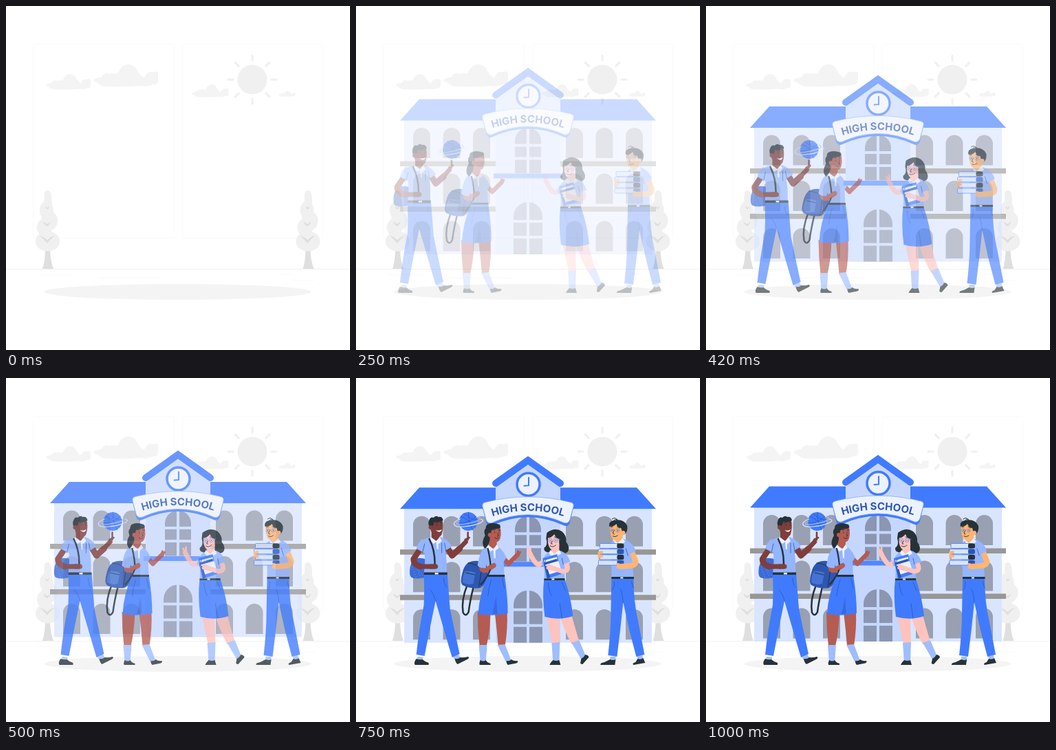
Write an HTML page that moves like this. It is 500 px wide and 500 px high and loops after 1.04 s.

```html
<!DOCTYPE html>
<html lang="en">
<head>
<meta charset="utf-8">
<title>High school</title>
<style>
html, body { margin: 0; width: 100%; height: 100%; overflow: hidden; background: #fff; }
svg { display: block; width: 100vw; height: 100vh; }
.blue { fill: #407bff; }
.shirt { fill: #94b5ff; }
.sock { fill: #9fbdff; }
.pale { fill: #ecf2ff; }
.navy { fill: #2d56b2; }
.dark { fill: #263238; }
.line { fill: none; stroke: #263238; stroke-linecap: round; stroke-linejoin: round; }
.fold { fill: none; stroke: #2d56b2; stroke-width: .8; stroke-linecap: round; }
.limb { fill: none; stroke-linecap: round; stroke-linejoin: round; }
.s1 { fill: #7f3e3b; } .s2 { fill: #b55b52; } .s3 { fill: #ffc3bd; } .s4 { fill: #ffb573; }
.l1 { stroke: #7f3e3b; } .l2 { stroke: #b55b52; } .l3 { stroke: #ffc3bd; } .l4 { stroke: #ffb573; }
text { font: 700 15px Inter, "Open Sans", sans-serif; fill: #2d56b2; }
</style>
</head>
<body>
<svg viewBox="0 0 500 500">
<defs>
  <path id="cloud" d="M0 24C3 20 8 21 12 19C15 13 21 13 24 15C28 12 33 16 36 13C40 4 46 0 53 1C61 2 63 9 67 15C70 17 71 20 74 20C77 13 82 10 87 12Q95 9 94 17V25Q94 31 86 30C81 33 75 33 68 32Q45 34 22 33C14 34 8 30 6 27Q2 27 0 24Z"/>
  <g id="tree">
    <path fill="#dfdfdf" d="M57 352H64Q64 370 69 382H53Q57 370 57 352Z"/>
    <g fill="#f0f0f0">
      <path d="M60 268C68 268 66 282 67 294H54C54 288 56 285 55.500 277Q55 268 60 268Z"/>
      <ellipse cx="59" cy="297" rx="10" ry="13.500"/>
      <ellipse cx="63" cy="312" rx="12" ry="14"/>
      <ellipse cx="56" cy="322" rx="11" ry="13"/>
      <ellipse cx="60.500" cy="342" rx="17.500" ry="14.500"/>
    </g>
    <path fill="#dfdfdf" d="M57 291L60 293 63 291Q62 295 60 295.500Q58 295 57 291ZM54 313L60 317 65 313Q63 319 60 320Q56 319 54 313ZM49 334Q55 335 60 340Q66 334 71 334Q66 337 60 345Q55 339 49 334Z"/>
  </g>
  <path id="arch" d="M0 44V12.500A12.500 12.500 0 0 1 25 12.500V44Z"/>
  <path id="curve" d="M180 206Q250 177 320 206"/>
</defs>

<g fill="none" stroke="#fafafa">
  <rect x="39.500" y="55.500" width="205" height="282" rx="3"/>
  <rect x="256.500" y="55.500" width="204" height="282" rx="3"/>
  <path stroke="#f3f3f3" d="M0 382.500H500"/>
  <path d="M45 390.500H97M136 395.500H225M400 389.500H416M416 398.500H449"/>
</g>
<g fill="#f4f4f4">
  <use href="#cloud" transform="translate(127 84)"/>
  <use href="#cloud" transform="translate(58 98.500) scale(.69)"/>
  <use href="#cloud" transform="translate(270 113.500) scale(.57)"/>
  <use href="#cloud" transform="translate(396 123) scale(.26)"/>
  <ellipse cx="249.500" cy="415.500" rx="194" ry="11.500"/>
</g>
<circle cx="358" cy="107" r="21.500" fill="#f0f0f0"/>
<g id="rays" stroke="#f0f0f0" stroke-width="3.200" stroke-linecap="round"></g>
<use href="#tree"/>
<use href="#tree" x="378.500"/>

<g id="school">
  <path fill="#d9e5ff" d="M70 187H430V383H70Z"/>
  <path class="blue" d="M92 157.500H408L436 188.500H64Z"/>
  <g id="windows" fill="#98a0b2"></g>
  <path fill="#979797" d="M64 247.500H436V255H64ZM64 313.500H436V321H64Z"/>
  <path fill="#c6d7ff" d="M203 151L250 119 297 151V383H203Z"/>
  <path fill="none" stroke="#407bff" stroke-width="10" stroke-linecap="round" d="M203 151.500L250 118 297 151.500"/>
  <g fill="#8b96b2">
    <path d="M231 265V218A19 19 0 0 1 269 218V265Z"/>
    <path d="M229 383V328A21 21 0 0 1 271 328V383Z"/>
  </g>
  <path stroke="#c6d7ff" stroke-width="4" d="M250 197V265M231 224.500H269M231 243.500H269M250 306V383M229 335H271M229 358H271"/>
  <path fill="#5288ff" d="M200 265.500H300V272.500H200Z"/>
  <circle class="pale" cx="250.500" cy="153" r="16.500" stroke="#407bff" stroke-width="3.500"/>
  <path fill="none" stroke="#407bff" stroke-width="2" stroke-linecap="round" d="M251 143V154.500L244.500 155"/>
  <path class="blue" d="M188 181Q250 164 312 181Q317 182 316 187L311 208Q309 215 303 213Q250 188 197 213Q191 215 189 208L184 187Q183 182 188 181Z"/>
  <path class="pale" stroke="#7fa5ff" stroke-width=".7" d="M188 179Q250 163 312 179Q317 180 316 185L311 204Q309 210 303 209Q250 185 197 209Q191 210 189 204L184 185Q183 180 188 179Z"/>
  <text text-anchor="middle"><textPath href="#curve" startOffset="50%">HIGH SCHOOL</textPath></text>
</g>

<g id="left">
  <!-- boy with ball -->
  <path fill="#3c6bd6" d="M80 265Q88 259 102 264L103 288Q90 294 79 290Q75 287 77 275Z"/>
  <path fill="none" stroke="#7fa5ff" stroke-dasharray="1 3" d="M80 274L86 291M83 268L93 291M90 280L98 290"/>
  <path class="sock" d="M88 405L96 406 95 412 87 411ZM139 405L147 401 151 408 143 411Z"/>
  <path class="dark" d="M86 408Q91 410 95 409Q99 413 104 414V417H84Q82 413 86 408ZM142 408Q147 409 150 406Q156 407 161 405Q165 407 158 410L146 416Q143 414 142 408Z"/>
  <path class="blue" d="M97 284H131Q133 310 135 335Q140 360 149 401L138 406Q127 369 114 324Q106 362 98 404L86 402Q90 365 97 330Q98 308 97 284Z"/>
  <path class="fold" d="M114 324Q112 314 106 308M126 291Q126 301 130 304"/>
  <path class="limb l1" stroke-width="9" d="M130 245L138 258 149 248"/>
  <path class="limb l1" stroke-width="6.500" d="M140 257L158 238"/>
  <path class="limb l1" stroke-width="2.600" d="M161 235V224.500M157 235L163 232"/>
  <path class="shirt" d="M105 232L121 231Q132 234 138 245L128 251Q131 265 130 284H97Q100 262 97 251L87 248Q91 234 105 232Z"/>
  <path class="limb l1" stroke-width="8.500" d="M92 248L82 263Q82 271 92 274"/>
  <path class="limb l1" stroke-width="7" d="M85 270Q88 274 97 274H112"/>
  <path class="shirt" d="M95 234L104 240 97 254 86 248Q89 238 95 234Z"/>
  <path class="fold" d="M98 241L95 254M127 240L129 251M123 240V254"/>
  <path class="s1" d="M108 222H120V233Q116 240 108 234Z"/>
  <path class="pale" d="M107 231L115 237 120 231 123 237 119 241 115 238 111 241 105 235ZM115 238H118V249H116Z"/>
  <path class="s1" d="M106 208Q115 201 124 208Q126 217 123 227Q121 232 114 230Q107 227 106 216Z"/>
  <path class="dark" d="M106 219Q102 211 105 206Q107 201 111 203Q115 199 118 202Q124 201 125 207Q121 210 112 209Q111 216 106 219Z"/>
  <circle class="s1" cx="107" cy="217" r="3"/>
  <path class="line" stroke-width=".9" d="M116 213V214M122 213V214M114 210.500L118 209.500M121 210L124 210"/>
  <path fill="#fff" d="M114 221Q119 223 123 220Q121 227 114 221Z"/>
  <path class="dark" d="M97 282.500H131V286H97Z"/>
  <path fill="#fff" d="M113 283H118V285.500H113Z"/>
  <path class="line" stroke-width="2.500" d="M105 234Q113 250 113 270"/>
  <path class="limb l1" stroke-width="7" d="M107 274L114 274"/>
  <circle class="blue" cx="161.500" cy="208.500" r="13.500"/>
  <path class="fold" d="M151 201Q162 206 172 217M162 195Q161 208 168 221M149 211Q161 212 173 201M155 197Q169 208 175 206"/>
  <g fill="none" stroke="#d9e5ff" stroke-width="1.200">
    <path d="M150 205C135 210 139 218 156 216C176 214 190 207 179 205"/>
    <path stroke="#9fbdff" d="M149 208C139 212 145 214 157 212C172 210 184 205 176 202"/>
  </g>

  <!-- girl with bag -->
  <path class="line" stroke-width="2.500" d="M160 301Q151 323 154 341Q158 348 162 340Q164 324 169 304"/>
  <path class="navy" d="M162 268Q174 263 186 269Q193 273 190 286Q187 301 179 305Q165 307 153 301Q149 297 153 283Q155 273 162 268Z"/>
  <path fill="#4573d3" d="M157 281Q165 280 172 283L169 299Q160 302 153 297Q153 287 157 281Z"/>
  <path class="line" stroke-width="1" d="M161 269Q174 270 181 278L177 304M158 283L171 286"/>
  <path class="s2" d="M175 340H194Q193 368 188 390H178Q175 365 175 340ZM200 340H218Q219 365 215 389H205Q203 365 200 340Z"/>
  <path class="sock" d="M177 388H189L187 413H179ZM204 388L215 387 224 411 217 414Z"/>
  <path class="dark" d="M179 410Q184 413 187 410Q189 414 194 415V417H178Q177 414 179 410ZM217 411Q222 412 224 409Q228 412 233 411Q235 414 229 415L219 417Q217 415 217 411Z"/>
  <path class="blue" d="M190 286H214Q219 317 219 342Q198 347 176 343Q177 316 190 286Z"/>
  <path class="navy" opacity=".45" d="M202 318L197 343H204Z"/>
  <path class="fold" d="M195 293Q191 305 190 317M211 291L214 306"/>
  <path class="limb l2" stroke-width="6.500" d="M211 260L220 270 233 257"/>
  <path class="limb l2" stroke-width="3" d="M232 258L234 252M234 258L237 253"/>
  <path class="shirt" d="M190 244L201 243Q210 246 217 261L213 267 214 287H190Q190 275 187 270L176 273Q178 249 190 244Z"/>
  <path class="limb l2" stroke-width="7" d="M181 272Q180 282 188 279L198 273"/>
  <path class="shirt" d="M186 246Q193 249 190 260L187 276Q180 277 175 273Q178 251 186 246Z"/>
  <path class="s2" d="M191 231H203V243Q199 251 191 244Z"/>
  <path class="pale" d="M190 242L198 249 203 242 206 247 201 251 198 250 194 252 188 246ZM198 250H201V262H199Z"/>
  <path class="dark" d="M192 217Q182 218 186 229Q179 241 186 248Q194 241 193 229Z"/>
  <path class="s2" d="M192 216Q201 210 208 217Q210 226 208 233Q206 240 199 238Q191 234 191 223Z"/>
  <path class="dark" d="M191 231Q184 218 189 213Q196 209 207 213Q210 217 206 219Q197 219 195 222Q195 229 191 231Z"/>
  <circle class="s2" cx="193" cy="228" r="3"/>
  <path class="line" stroke-width=".9" d="M200 224V225M206 224V225M198 221L201 220M205 221L208 221M204 226L206 229 204 230M200 232Q203 235 206 232"/>
  <path class="dark" d="M190 286H214.500V289H190Z"/>
  <path class="line" stroke-width="2.200" d="M190 248Q194 265 194 277Q190 289 180 300"/>
  <path class="limb l2" stroke-width="6" d="M190 277L199 272"/>
</g>

<g id="right">
  <!-- girl with folders -->
  <path class="dark" d="M279 225Q291 216 301 223Q308 229 307 238Q314 247 309 253Q300 259 291 253Q274 256 275 247Q281 243 278 233Z"/>
  <path class="s3" d="M278 344H297Q297 365 298 386H287Q282 365 278 344ZM297 344H315Q318 356 326 383L315 387Q305 368 297 344Z"/>
  <path class="sock" d="M286 385L298 384 297 413H288ZM315 385L326 381 336 405 329 409Z"/>
  <path class="dark" d="M288 410Q293 412 297 410L299 417H283Q284 414 288 410ZM329 408Q333 406 335 402Q340 403 340 406L331 416Q327 416 328 413Z"/>
  <path class="blue" d="M275 292H305Q314 318 317 346Q297 353 276 347Q272 317 275 292Z"/>
  <path class="fold" d="M281 298Q282 310 286 316M301 297L306 309M298 328L301 349"/>
  <path class="limb l3" stroke-width="7" d="M278 265L268 271Q263 273 254 254"/>
  <path class="limb l3" stroke-width="2.800" d="M254 254L251 248M255 254V246"/>
  <path class="shirt" d="M284 252L299 251Q309 255 313 267L305 272V293H275Q276 281 275 275L271 270Q275 255 284 252Z"/>
  <path class="s3" d="M286 243H297V252Q291 260 285 252Z"/>
  <path class="s3" d="M281 231Q289 223 298 231Q300 239 296 246Q290 252 284 248Q279 241 281 231Z"/>
  <path class="dark" d="M279 236Q280 224 291 221Q302 223 303 237Q307 245 300 250Q296 243 297 234Q292 233 290 227Q286 232 281 232Z"/>
  <g fill="none" stroke="#407bff" stroke-width=".6"><circle cx="284" cy="236" r="2.600"/><circle cx="292" cy="236" r="2.800"/><path d="M295 235L299 234"/></g>
  <path class="line" stroke-width=".9" d="M284 236V236.500M292 236V236.500M282 232L285 231M290 231L294 232M287 237L285 241 287 241M284 244Q288 247 292 243"/>
  <path class="pale" d="M284 250L290 256 297 250 300 255 294 259 290 257 286 259 282 255Z"/>
  <path class="blue" d="M273 262L294 256 300 285 279 292Z"/>
  <path class="pale" d="M275 265L294 260 294 263 276 268ZM277 271L296 266 300 280 281 286Z"/>
  <path class="navy" d="M274 269L293 263 294 266 275 272ZM276 274L279 273 284 290 280 291Z"/>
  <path class="limb l3" stroke-width="7" d="M307 269Q313 281 302 281L286 276"/>
  <path class="limb l3" stroke-width="4" d="M288 275L281 272M287 278L280 276"/>
  <path class="shirt" d="M301 253Q310 257 313 267L302 271Q297 262 301 253Z"/>
  <path class="fold" d="M301 262L303 271M278 263L275 273"/>
  <path class="dark" d="M275 291.500L305 291V294H275Z"/>
  <path fill="#fff" d="M286 291.500H290V293.500H286Z"/>

  <!-- boy with books -->
  <path class="sock" d="M371 405H379V412H371ZM410 404L418 403 419 410 412 411Z"/>
  <path class="dark" d="M371 409Q376 411 379 409L378 417H357Q356 414 363 413ZM411 408Q416 410 419 407L422 414 405 417Q402 415 408 413Z"/>
  <path class="blue" d="M373 290H405Q405 325 412 355L421 402 409 405Q398 366 390 326Q386 366 381 405L368 403Q372 367 372 343Z"/>
  <path class="fold" d="M390 326Q389 312 386 307M377 296Q378 304 374 308M402 296L405 305"/>
  <path class="shirt" d="M378 236L390 234Q402 237 408 250L403 257 405 291H373Q374 265 370 247Q371 238 378 236Z"/>
  <path class="s4" d="M377 228H389V237Q384 243 377 238Z"/>
  <path class="pale" d="M376 235L382 240 389 233 393 238 386 243 382 241 379 243Z"/>
  <path class="s4" d="M371 214Q381 207 390 216Q392 227 387 234Q380 239 374 233Q370 225 371 214Z"/>
  <path class="dark" d="M370 216Q368 209 376 207Q391 204 396 215Q397 224 391 228Q388 224 387 218Q382 218 380 212Q377 216 370 216Z"/>
  <path class="line" d="M381 207Q379 201 374 205M382 206Q379 203 377 207"/>
  <circle class="s4" cx="390" cy="225" r="3"/>
  <path class="line" stroke-width=".9" d="M374 221V222M382 221V222M372 217L375 216M381 216L385 218M377 221L375 226 377 227M375 230Q379 232 382 229"/>
  <g fill="none" stroke="#407bff" stroke-width=".6"><circle cx="374" cy="221.500" r="2.400"/><circle cx="382" cy="221.500" r="2.600"/></g>
  <path class="limb l4" stroke-width="7" d="M358 251L357 262"/>
  <g id="books"></g>
  <path class="limb l4" stroke-width="8" d="M402 251L408 266Q409 272 400 273L386 274"/>
  <path class="limb l4" stroke-width="4" d="M391 274L382 271M391 275L382 275M355 254L359 253M355 259L359 259"/>
  <path class="shirt" d="M395 237Q405 241 408 251L397 258Q390 248 395 237Z"/>
  <path class="fold" d="M394 248L397 258"/>
  <path class="dark" d="M373 289H405.500V292H373Z"/>
  <path fill="#fff" d="M386 289.500H390V291.500H386Z"/>
</g>
</svg>
<script>
const $ = id => document.getElementById(id);
const school = $("school"), left = $("left"), right = $("right");

for (let a = 0; a < 360; a += 45)
  $("rays").innerHTML += `<path d="M358 72V79" transform="rotate(${a} 358 107)"/>`;
for (const y of [199, 265.5, 334.5])
  for (const x of [83, 126.5, 170, 305, 348.5, 392])
    $("windows").innerHTML += `<use href="#arch" x="${x}" y="${y}"/>`;
for (let i = 0; i < 4; i++) {
  const x = i % 2 ? 354 : 356, y = 240.5 + i * 8.2, spine = i % 2 ? "navy" : "dark";
  $("books").innerHTML +=
    `<rect fill="#d9e5ff" x="${x}" y="${y}" width="${388 - x}" height="7" rx="1" stroke="#407bff" stroke-width=".8"/>` +
    `<rect class="${spine}" x="381" y="${y}" width="10" height="7" rx="2"/>`;
}

// cubic-bezier(.36, -.01, .5, 1.38)
const cubic = (a, b, s) => 3 * a * s * (1 - s) ** 2 + 3 * b * s * s * (1 - s) + s ** 3;
function ease(x) {
  if (x >= 1) return 1;
  let lo = 0, hi = 1;
  for (let i = 0; i < 24; i++) {
    const mid = (lo + hi) / 2;
    if (cubic(.36, .5, mid) < x) lo = mid; else hi = mid;
  }
  return cubic(-.01, 1.38, lo);
}

function draw(now) {
  const t = now % 1040;
  const step = Math.floor((Math.floor(t / 10) * 10 + 4.9) * .024); // 24 steps per second
  const p = ease((step + .5) / 24), shift = 30 * (1 - p);
  const place = (el, x, y) => {
    el.setAttribute("transform", `translate(${x} ${y})`);
    el.setAttribute("opacity", step < 3 ? 0 : Math.min(1, p));
  };
  place(school, 0, -shift);
  place(left, -shift, 0);
  place(right, shift, 0);
}

const start = performance.now();
function loop() {
  draw(performance.now() - start);
  requestAnimationFrame(loop);
}
loop();
</script>
</body>
</html>
```
